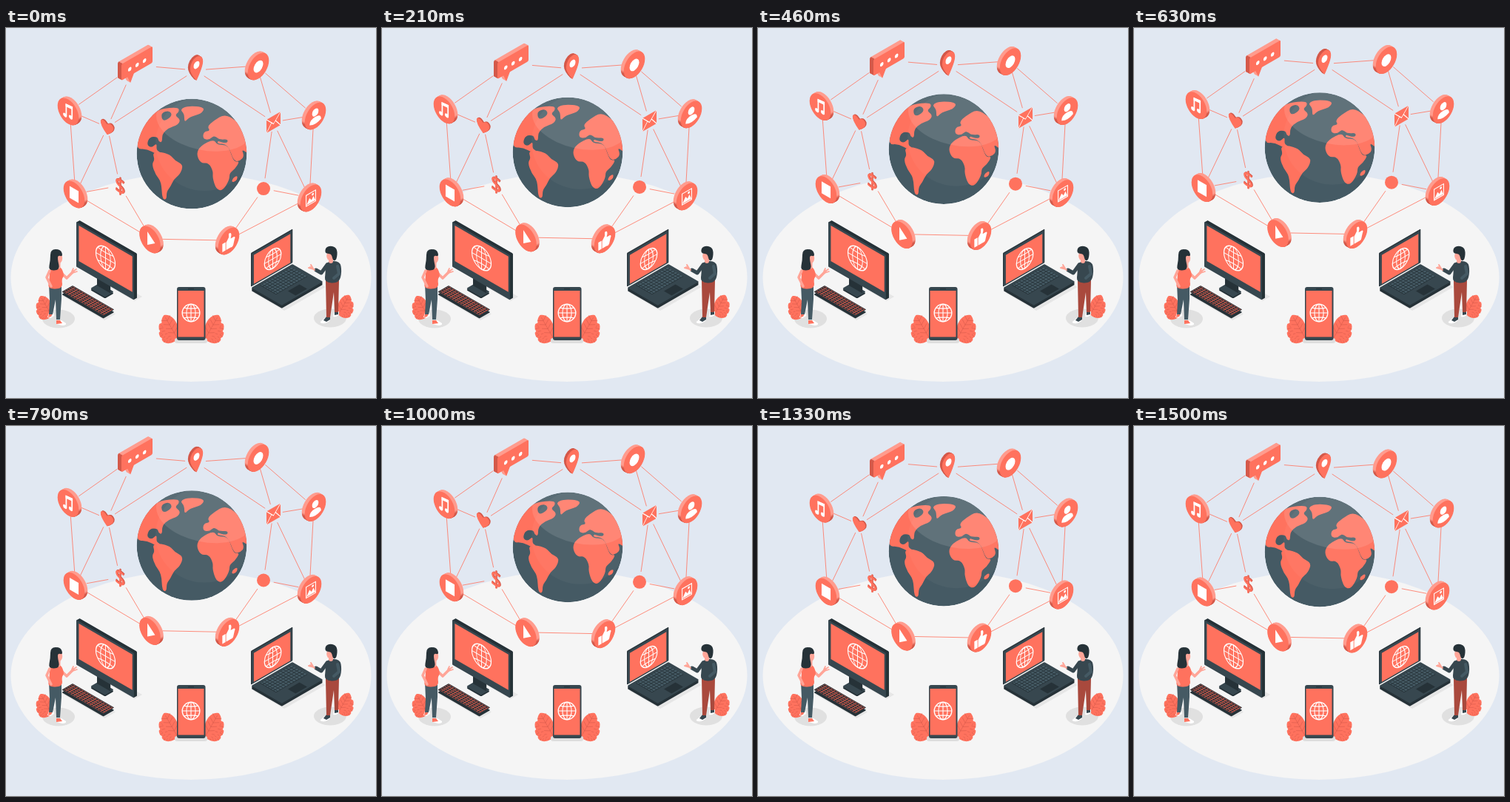
An HTML page that plays this animation: 500x500 px, repeating every 1540 ms.

```html
<!DOCTYPE html>
<html lang="en">
<head>
<meta charset="utf-8">
<title>Connected world</title>
<style>
html, body { margin: 0; width: 100%; height: 100%; overflow: hidden; background: #e1e8f2 }
svg { display: block; width: 100%; height: 100% }
</style>
</head>
<body>
<svg id="stage" viewBox="0 0 500 500"></svg>
<script>
const coral = '#ff725e', deep = '#d4594a', pale = '#ff9c8e', skin = '#ffa598', white = '#fff';
const steel = '#455a64', slate = '#37474f', ink = '#263238', grey = '#e0e0e0', brick = '#a9493d';

const path = (d, fill, extra = '') => `<path d="${d}" fill="${fill}" ${extra}/>`;
const stroke = (d, color, width, extra = '') =>
  path(d, 'none', `stroke="${color}" stroke-width="${width}" ${extra}`);
const limb = (d, color, width) => stroke(d, color, width, 'stroke-linecap="round" stroke-linejoin="round"');
const oval = (x, y, rx, ry, fill, extra = '') =>
  `<ellipse cx="${x}" cy="${y}" rx="${rx}" ry="${ry}" fill="${fill}" ${extra}/>`;
const disc = (r, fill, extra) => oval(0, 0, r, r, fill, extra);
const rect = (x, y, w, h, fill, rx = 0) =>
  `<rect x="${x}" y="${y}" width="${w}" height="${h}" rx="${rx}" fill="${fill}"/>`;
const at = (x, y, body, angle = 0) => `<g transform="translate(${x} ${y}) rotate(${angle})">${body}</g>`;

// Isometric planes: a wall with side 1 slopes down to the right, -1 slopes up.
const wall = (x, y, side, body) => `<g transform="matrix(.866 ${side / 2} 0 1 ${x} ${y})">${body}</g>`;
const floor = (x, y, body) => `<g transform="matrix(.866 .5 -.866 .5 ${x} ${y})">${body}</g>`;

// A wall shape with thickness reaching back by the given depth.
function extrude(x, y, side, depth, shape, edge, face = coral) {
  let out = '';
  for (let i = depth; i > 0; i -= .5) out += wall(x + side * i, y - i * .55, side, shape(edge));
  return out + wall(x, y, side, shape(face));
}

// A smooth closed outline led by a few key points.
function blob(points, fill) {
  const p = points.split(' ').map(s => s.split(',').map(Number));
  const mid = (a, b) => [(a[0] + b[0]) / 2, (a[1] + b[1]) / 2];
  const curves = p.map((q, i) => `Q${q} ${mid(q, p[(i + 1) % p.length])}`);
  return path(`M${mid(p[p.length - 1], p[0])}${curves.join('')}Z`, fill);
}

function wire(r) {
  let lines = `M0 ${-r}V${r}M${-r} 0H${r}`;
  for (const s of [-1, 1]) lines += `M${-r * .8} ${s * r * .58}Q0 ${s * r * .42} ${r * .8} ${s * r * .58}`;
  return stroke(lines, white, 1.1) + disc(r, 'none', 'stroke="#fff" stroke-width="1.4"') +
    oval(0, 0, r * .52, r, 'none', 'stroke="#fff" stroke-width="1.1"');
}

function leaf(length) {
  const w = length * .34;
  let veins = `M0 0V${-length * .9}`;
  for (let v = .25; v < .8; v += .17)
    veins += `M${-w * .55} ${-length * (v + .12)}L0 ${-length * v}L${w * .55} ${-length * (v + .12)}`;
  return path(`M0 0C${-w} ${-length * .3} ${-w} ${-length * .9} 0 ${-length}
    C${w} ${-length * .9} ${w} ${-length * .3} 0 0Z`, coral) + stroke(veins, deep, .5);
}

function fan(x, y, side, size) {
  let out = '';
  for (let i = 3; i >= 0; i--) out += at(x, y, leaf(size * (1 - i * .14)), side * (30 + 21 * i));
  return out;
}

function keys(w, h, rows, color) {
  let d = '';
  for (let i = 0; i < rows; i++) d += `M0 ${h * (i + .5) / rows}h${w}`;
  return stroke(d, color, h / rows - .9, 'stroke-dasharray="3.3 .9"');
}

// Each node: x, y and the clear space that links leave around it.
const nodes = {
  chat: [174, 50, 29], pin: [256, 57, 14], disc: [339, 51, 15], mail: [361, 127, 13], user: [416, 118, 15],
  note: [86, 112, 15], heart: [137, 134, 12], square: [94, 224, 15], dollar: [154, 213, 16],
  play: [196.5, 285, 15], thumb: [299, 287, 15], dot: [348, 217, 14], picture: [410, 229, 15]
};
const links = `chat-note chat-heart chat-pin pin-heart pin-disc pin-mail disc-mail disc-user user-mail
  note-heart note-square heart-square heart-dollar dollar-square square-play dollar-play play-thumb
  thumb-dot thumb-picture dot-mail dot-picture mail-picture user-picture`.split(/\s+/).map(pair => {
    const [[ax, ay, ga], [bx, by, gb]] = pair.split('-').map(name => nodes[name]);
    const dx = bx - ax, dy = by - ay, n = Math.hypot(dx, dy);
    return `M${ax + dx * ga / n} ${ay + dy * ga / n}L${bx - dx * gb / n} ${by - dy * gb / n}`;
  }).join('');

const icons = {
  note: stroke('M-3 7V-8L6 -9V5', white, 2) + path('M-4 -9L7 -10V-6L-4 -5Z', white) +
    oval(-5, 7, 3, 2.6, white) + oval(4, 5.5, 3, 2.6, white),
  square: rect(-7, -8, 14, 16, white),
  disc: disc(7.5, white),
  play: path('M-4 -9L8 1L-4 9Z', white),
  user: oval(0, -5, 5, 5, white) + path('M-9 8Q-9 1 0 1Q9 1 9 8Q0 13 -9 8Z', white),
  picture: rect(-8, -8, 16, 16, white) + rect(-6.8, -6.8, 13.6, 13.6, coral) +
    path('M-7 6L-2 -1L1 3L4 -1L7 6Z', white) + oval(3, -4, 1.6, 1.6, white),
  thumb: path('M-10 -1H-5V10H-10ZM-4 0L0 -5V-10Q4 -11 4 -6L3 -2H8Q11 -1 9 2L7 9Q6 11 3 10H-4Z', white)
};
const coins = Object.keys(icons).map(name => {
  const [x, y] = nodes[name], side = x < 250 ? 1 : -1;
  return extrude(x - side * 2, y + 1, side, 4, fill => disc(16.5, fill), 'url(#rim)') +
    wall(x - side * 2, y + 1, side, icons[name]);
}).join('');

const northAmerica = `176,164 179,140 197,117 209,109 233,107 234,113 228,118 236,124 232,131 220,135 211,143
  211,155 206,153 205,147 194,147 190,158 197,162 204,155 203,165 209,168 204,171 190,163`;
const southAmerica = `198,169 207,167 222,171 228,179 240,185 235,198 227,204 222,215 217,221 217,232 211,231
  210,208 202,198 197,184 201,178`;
const greenland = '235,110 246,105 269,107 264,116 248,120 241,128 241,116';
const eurasia = `266,150 267,140 276,139 272,133 281,125 296,116 312,126 330,145 330,172 318,163 322,173 317,179
  308,181 300,157 284,156 289,151 281,145 275,151`;
const africa = `257,170 263,159 281,150 285,158 300,158 305,173 309,181 316,180 309,191 302,196 302,205
  293,220 284,218 279,202 280,194 274,182 263,183`;
const squash = s => s.replace(/\s+/g, ' ');

const world = '<g clip-path="url(#ball)">' + oval(251, 170, 74.3, 74.3, steel) +
  [northAmerica, southAmerica, greenland, eurasia, africa].map(s => blob(squash(s), coral)).join('') +
  blob('209,115 221,111 225,119 212,127', steel) + blob('278,145 289,151 300,150 299,156 285,153', steel) +
  blob('305,209 306,203 313,199 312,206', coral) +
  oval(268, 156, 66, 64, white, 'opacity=".035"') +
  oval(268, 128, 66, 37, white, 'opacity=".11" transform="rotate(12 268 128)"') + '</g>';

const bubble = extrude(156, 49, -1, 5, fill => rect(0, 0, 48.5, 22, fill, 2) +
    path('M9 21L14 32L20 21Z', fill), 'url(#edge)') +
  wall(156, 49, -1, [13, 24.5, 36].map(x => oval(x, 13, 2.7, 2.6, white)).join(''));

const dollar = fill => `<text text-anchor="middle" y="10" font-family="'Open Sans', sans-serif"
  font-weight="600" font-size="29" fill="${fill}">$</text>`;

const symbols = extrude(257.5, 52, -1, 3, fill => path('M0 19Q-10 5 -10 -2A10 11 0 0 1 10 -2Q10 5 0 19Z', fill), deep) +
  wall(257.5, 50, -1, oval(0, 0, 4.6, 4.8, white)) +
  extrude(136.5, 134, 1, 1.5, fill => path('M0 10Q-11 2 -10 -4Q-7 -10 0 -4Q7 -10 10 -4Q11 2 0 10Z', fill), deep) +
  wall(361.5, 127.5, -1, rect(-11, -9, 22, 18, coral) +
    stroke('M-11 -9L0 2L11 -9M-11 9L-3 -1M11 9L3 -1', white, 1)) +
  extrude(154, 214, 1, 1, dollar, deep) + oval(348, 217, 9, 9, coral);

const network = stroke(links, coral, .8) + world + bubble + symbols + coins;

const monitor = floor(146, 341, rect(0, 0, 44, 12, '#e6e6e6')) +
  floor(126, 347, rect(0, 0, 23, 14, ink, 2)) + floor(126, 345, rect(0, 0, 23, 14, slate, 2)) +
  wall(123, 335, 1, rect(0, 0, 21, 13, ink)) +
  extrude(95, 262, 1, 4, fill => rect(0, 0, 90, 60.5, fill, 1), ink, slate) +
  wall(95, 262, 1, rect(4, 3, 83.5, 48, coral)) + wall(134.5, 311, 1, wire(15));

const keyboard = floor(90, 353, rect(0, 0, 67, 17, '#e6e6e6')) + floor(90, 351.5, rect(0, 0, 65, 17, ink, 1)) +
  floor(90, 348, rect(0, 0, 65, 17, ink, 1) + rect(1, 1, 63, 15, deep)) + floor(90, 349, keys(63, 15, 5, ink));

let laptop = floor(390, 326, rect(0, 0, 48, 64, '#e6e6e6'));
for (let y = 323; y > 318; y--) laptop += floor(387, y, rect(0, 0, 47.5, 64, y > 319 ? ink : slate, 1));
laptop += floor(387, 319, rect(3, 5, 25.5, 49, ink) + rect(33, 22, 12, 18, ink)) +
  at(0, 0, floor(387 + 26.5 * .866, 319 + 13, '') ) +
  floor(385.3, 323, `<g transform="matrix(0 1 1 0 0 0)">${keys(48, 25, 6, steel)}</g>`) +
  wall(331, 304, -1, rect(0, 0, 65, 45.5, ink, 1) + rect(1, 1.5, 63, 44, slate) + rect(4.5, 5, 57, 39, coral)) +
  wall(360.5, 312, -1, wire(13));

const phone = fan(232, 420, -1, 37) + fan(269, 420, 1, 37) + rect(228, 419, 44, 7, '#dedede', 3) +
  rect(231, 350, 38.5, 72, slate, 3) + rect(232.5, 355, 35, 62.5, coral) + rect(246, 352, 8, 1.2, ink) +
  at(250, 385, wire(11.8));

const woman = oval(71, 393, 22, 12.5, grey) + fan(62, 389, -1, 31) +
  path('M58 385h6l1 4-5 3-4-1zM68 395h7l6 4q1 3-5 3l-8-2z', white) +
  path('M58 386h5l-2 4-4 1zM68 395h5l3 4-8 1z', coral) +
  path('M58 346L75 347L75 366L73 394H68L67 367L63 387H58L59 368Z', steel) +
  limb('M75 331L82 338L91 329', skin, 3.6) + limb('M89 330L95 326M90 331L96 329M89 329L91 325', skin, 1.7) +
  blob('59,324 74,321 79,335 75,339 77,352 56,353 59,338', coral) +
  limb('M59 328L55 337L61 349', skin, 3.5) + limb('M71 316V323', skin, 5) +
  oval(71.5, 311, 4.7, 7, skin) + blob('77,309 74,299 60,299 60,314 57,328 73,327 70,314 70,307', ink);

const man = oval(438, 392, 22, 12.5, grey) + fan(449, 387, 1, 30) +
  path('M433 390h5v5q-5 5-11 4-4-1-1-3zM444 383h6v4q-3 4-8 3z', white) +
  path('M433 390h5v4l-5 3-4-2zM444 383h5v4l-5 1z', slate) +
  path('M432 341L450 341L449 384H444L443 357L438 391H433Z', brick) +
  blob('431,316 451,314 454,329 450,345 430,344 432,330', slate) +
  limb('M434 320L426 331L419 327', slate, 5) + limb('M448 322L450 332L443 338', steel, 4) +
  limb('M417 327L411 323M415 325L412 320M416 326L409 324', skin, 2) + limb('M439 311V315', skin, 6) +
  oval(437.5, 308, 4.3, 6, skin) + blob('431,304 432,296 441,294 448,299 447,313 442,315 440,306 436,305', ink);

document.getElementById('stage').innerHTML = `<defs>
  <linearGradient id="rim" x2="0" y2="1">
    <stop offset=".5" stop-color="${pale}"/><stop offset=".62" stop-color="${deep}"/>
  </linearGradient>
  <linearGradient id="edge">
    <stop offset=".04" stop-color="${deep}"/><stop offset=".05" stop-color="${pale}"/>
  </linearGradient>
  <clipPath id="ball"><circle cx="251" cy="170" r="74.3"/></clipPath></defs>` +
  rect(0, 0, 500, 500, '#e1e8f2') + oval(250, 337, 243.5, 141, '#f5f5f5') +
  `<g id="network">${network}</g>` + monitor + keyboard + woman + laptop + man + phone;

const floating = document.getElementById('network');
const period = 1540;
function draw() {
  const phase = 2 * Math.PI * (performance.now() + 45) / period;
  floating.setAttribute('transform', `translate(0 ${4.4 * Math.cos(phase) - 4.25})`);
  requestAnimationFrame(draw);
}
draw();
</script>
</body>
</html>
```
